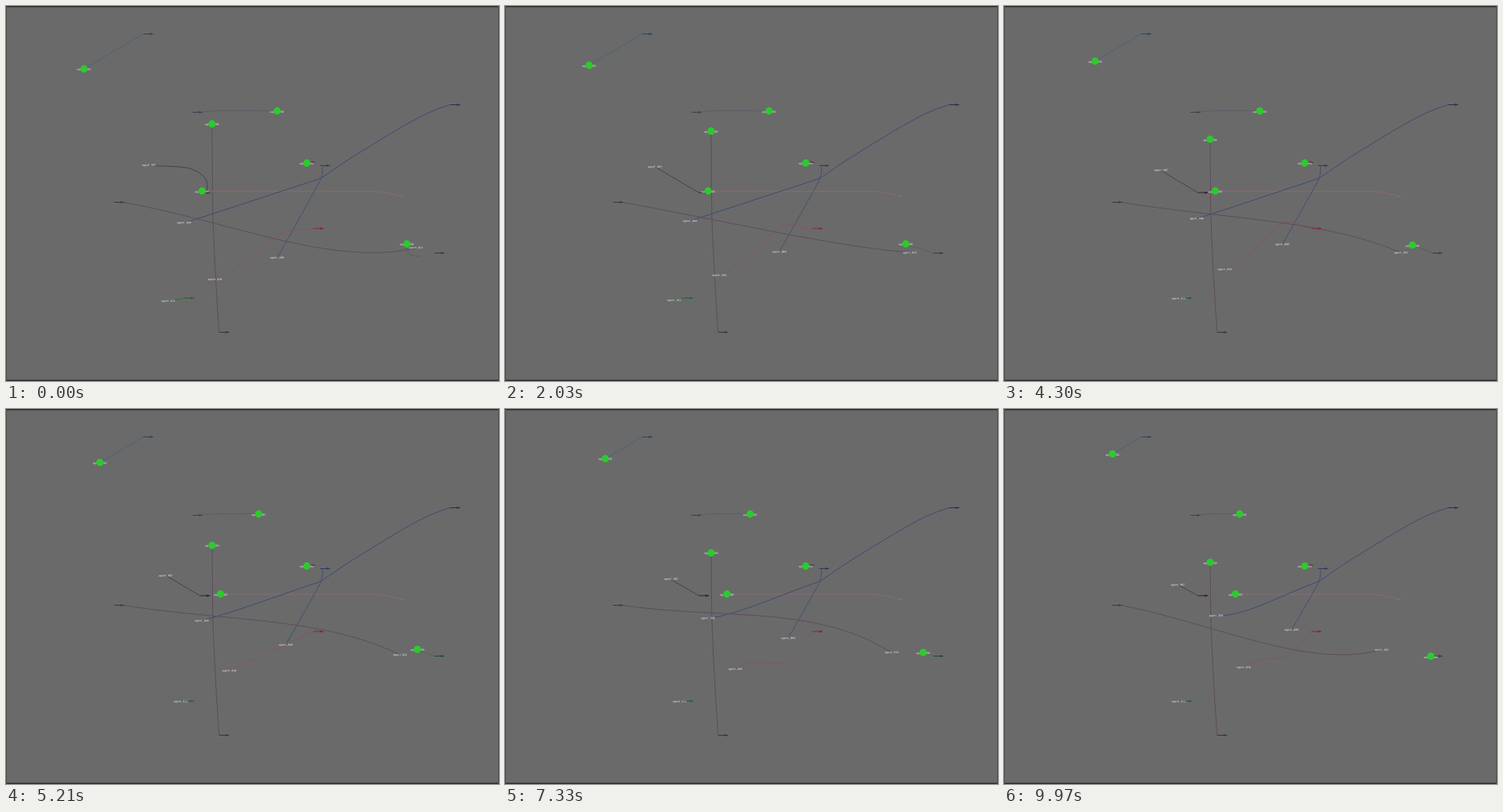
Write an HTML page with a canvas that moves like this. It is 591 px wide and 450 px high and loops after 10 s.

```html
<!DOCTYPE html>
<html lang="en">
<head>
<meta charset="utf-8">
<title>Agents and planned routes</title>
<style>
html, body { margin: 0; width: 100%; height: 100%; overflow: hidden; background: #6a6a6a; }
canvas { display: block; }
</style>
</head>
<body>
<canvas id="stage" width="591" height="450"></canvas>
<script>
const ctx = document.getElementById('stage').getContext('2d');
const LOOP = 10, FPS = 30;
const SPEED = 4.26;  // pixels per second, shared by every agent
const REPLAN = 2;    // seconds until detours are dropped

const mix = (a, b, k) => a + (b - a) * k;

// Point reached after walking a distance along a polyline.
function walk(trail, distance) {
  for (let i = 1; i < trail.length; i++) {
    const [ax, ay] = trail[i - 1], [bx, by] = trail[i];
    const length = Math.hypot(bx - ax, by - ay);
    if (distance <= length) return [mix(ax, bx, distance / length), mix(ay, by, distance / length)];
    distance -= length;
  }
  return trail[trail.length - 1];
}

function keyed(keys, t) {
  const i = Math.max(1, keys.findIndex(([time]) => time >= t));
  const [t0, v0] = keys[i - 1], [t1, v1] = keys[i];
  return mix(v0, v1, (t - t0) / (t1 - t0));
}

// Straight line pushed up or down by a swell; skew moves its peak along the line.
function bowed([ax, ay], [bx, by], { skew, swell }, t) {
  const size = keyed(swell, t), steps = 16, points = [];
  for (let i = 1; i < steps; i++) {
    const u = i / steps;
    points.push([mix(ax, bx, u), mix(ay, by, u) + size * Math.sin(Math.PI * u ** skew) ** 1.5]);
  }
  return points;
}

const agents = [
  { trail: [[93, 75], [164, 33]], goal: [164, 33], disc: true, line: '#48667b', mark: '#2d455d' },
  { trail: [[324.5, 125.5], [240, 125.5]], goal: [223, 127], disc: true, line: '#5b6068', mark: '#3c4250',
    via: [[290, 125], [240, 125]], end: [233, 127] },
  { trail: [[246.5, 141], [247, 235]], goal: [255, 391], disc: true, line: '#5e4e5a', mark: '#3d3443',
    via: [[247, 235], [248, 270], [252, 350]] },
  { trail: [[360, 188]], goal: [364, 187], disc: true, line: '#5b3840', mark: '#59313c', size: 6 },
  { trail: [[234.5, 221.5], [430, 221.5]], goal: [473, 228], disc: true, line: '#896a75', mark: '#896a75', size: 3,
    via: [[430, 222], [452, 222]], end: [474, 228] },
  { trail: [[480, 285], [484, 284], [513, 297]], wait: REPLAN, goal: [513, 296], disc: true,
    line: '#526857', mark: '#29414b', detour: [[479, 293], [485, 300], [497, 300]] },
  { trail: [[171, 191], [175, 191], [183, 194], [232, 226]], goal: [232, 223.5], line: '#4e414d', mark: '#292632',
    detour: [[205, 192], [221, 194], [236, 202], [242, 213], [240, 223]] },
  { trail: [[213, 260], [254, 247.5], [264, 244]], goal: [532, 118], line: '#414b75', mark: '#283151',
    bow: { to: [378, 206], skew: 0.6, swell: [[0, 0], [4, 0], [10, 6]] },
    via: [[378, 206], [400, 190], [440, 165], [490, 135], [518, 122]] },
  { trail: [[324.5, 302], [376, 204]], goal: [376, 191], line: '#435272', mark: '#2e3b5b',
    via: [[376, 210], [379, 202]], end: [379, 192] },
  { trail: [[250, 328], [264, 316], [271, 312], [300, 307]], goal: [368, 266.5], line: '#83585f', mark: '#86263b',
    bow: { to: [368, 266.5], skew: 1.7, swell: [[0, -14], [3, -24], [4.5, -22], [6, 25], [10, 14]] } },
  { trail: [[194, 354], [209, 351]], goal: [213, 350], line: '#35733d', mark: '#1f6530' },
  { trail: [[491, 290], [488, 294], [481, 297], [440, 285]], goal: [129, 235], line: '#5e4e5d', mark: '#41364c',
    bow: { to: [140, 235], skew: 0.6, swell: [[0, 18], [4, -10], [8.5, -23], [10, 19]] }, end: [140, 235] }
];

function plan(a, at, t) {
  if (a.detour && t < REPLAN) return [at, ...a.detour];
  const bend = a.bow ? bowed(at, a.bow.to, a.bow, t) : [];
  return [at, ...bend, ...(a.via || []), a.end || a.goal];
}

function route(points, color) {
  ctx.strokeStyle = color;
  ctx.lineWidth = 1;
  ctx.beginPath();
  ctx.moveTo(...points[0]);
  for (let i = 1; i < points.length - 1; i++) {
    const [x, y] = points[i], [nx, ny] = points[i + 1];
    const k = i === points.length - 2 ? 1 : 0.5;
    ctx.quadraticCurveTo(x, y, mix(x, nx, k), mix(y, ny, k));
  }
  ctx.lineTo(...points[points.length - 1]);
  ctx.stroke();
}

function arrow([x, y], color, size = 12) {
  ctx.strokeStyle = ctx.fillStyle = color;
  ctx.lineWidth = 1;
  ctx.beginPath();
  ctx.moveTo(x, y);
  ctx.lineTo(x + size, y);
  ctx.stroke();
  ctx.beginPath();
  ctx.moveTo(x + size, y);
  ctx.lineTo(x + size - 4, y - 1.5);
  ctx.lineTo(x + size - 4, y + 1.5);
  ctx.fill();
}

function label([x, y], i) {
  ctx.fillStyle = '#f0f0f0';
  ctx.fillText('agent_' + String(i + 1).padStart(3, '0'), x, y);
}

function disc([x, y]) {
  ctx.fillStyle = '#2bcb2d';
  ctx.beginPath();
  ctx.arc(x, y, 4.4, 0, Math.PI * 2);
  ctx.fill();
}

function backdrop() {
  ctx.fillStyle = '#6a6a6a';
  ctx.fillRect(0, 0, 591, 450);
  ctx.fillStyle = '#292b2c';
  ctx.fillRect(0, 0, 591, 1.4);
  ctx.fillRect(0, 448.6, 591, 1.4);
  ctx.fillStyle = '#4b4e50';
  ctx.fillRect(0, 0, 1, 450);
  ctx.fillRect(590, 0, 1, 450);
}

function draw(t) {
  backdrop();
  ctx.font = '3.1px "DejaVu Sans Mono", monospace';
  ctx.textAlign = 'center';
  ctx.textBaseline = 'middle';
  ctx.save();
  ctx.translate(0.5, 0.5);
  const spots = agents.map(a => walk(a.trail, SPEED * Math.max(0, t - (a.wait || 0))));
  agents.forEach((a, i) => route(plan(a, spots[i], t), a.line));
  agents.forEach(a => arrow(a.goal, a.mark, a.size));
  agents.forEach((a, i) => label([spots[i][0], spots[i][1] + (a.disc ? 1 : 0)], i));
  agents.forEach((a, i) => a.disc && disc(spots[i]));
  ctx.restore();
}

function frame() {
  const t = performance.now() / 1000 % LOOP;
  draw(Math.floor(t * FPS) / FPS);
  requestAnimationFrame(frame);
}
frame();
</script>
</body>
</html>
```
